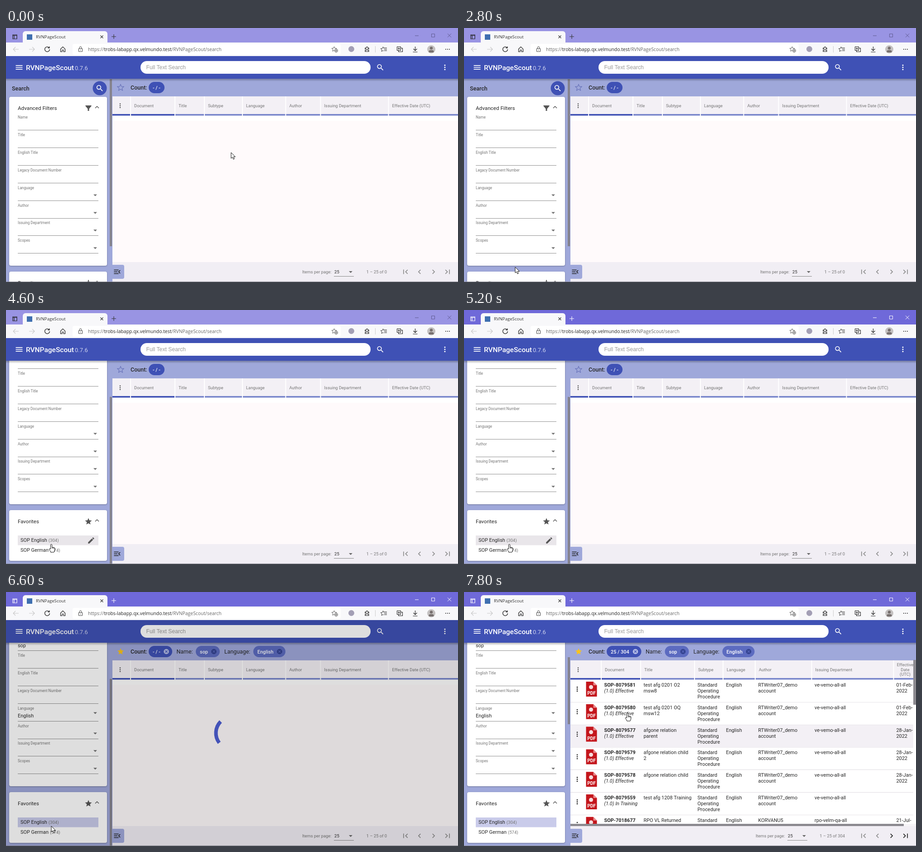
Write an HTML page with a canvas that moves like this. It is 998 by 561 pixels and loops after 8 s.

```html
<!DOCTYPE html>
<html lang="en">
<head>
<meta charset="utf-8">
<title>Document search</title>
<style>
html, body { margin: 0; width: 100%; height: 100%; overflow: hidden; background: #fff; }
canvas { display: block; width: 998px; height: 561px; }
</style>
</head>
<body>
<canvas id="stage" width="998" height="561"></canvas>
<script>
const ctx = document.getElementById('stage').getContext('2d');
const LOOP = 8000, STEP = 200;
const CLICK = 5200, LOADING = 5400, LOADED = 7600;
const INDIGO = '#3f51b5', MID = '#7986cb', PALE = '#9fa8da', PANEL = '#f3f0f5', GRAY = '#757575', INK = '#262626';
const UI = 'Roboto, sans-serif', CHROME = '"Open Sans", "Noto Sans", sans-serif';
const APP = 'RVNPageScout';

const ICONS = {
  search: 'M15.5 14h-.79l-.28-.27A6.47 6.47 0 0 0 16 9.5 6.5 6.5 0 1 0 9.5 16c1.61 0 3.09-.59 4.23-1.57l.27.28v.79l5 4.99L20.49 19zm-6 0C7 14 5 12 5 9.5S7 5 9.5 5 14 7 14 9.5 12 14 9.5 14z',
  star: 'M12 17.27L18.18 21l-1.64-7.03L22 9.24l-7.19-.61L12 2 9.19 8.63 2 9.24l5.46 4.73L5.82 21z',
  edit: 'M3 17.25V21h3.75L17.81 9.94l-3.75-3.75zM20.71 7.04a1 1 0 0 0 0-1.41l-2.34-2.34a1 1 0 0 0-1.41 0l-1.83 1.83 3.75 3.75z',
  filter: 'M3.5 4h17q1 1 0 2L14 14v6h-4v-6L3.5 6q-1-1 0-2z',
  drop: 'M7 10l5 5 5-5z',
  up: 'M12 8l-6 6 1.41 1.41L12 10.83l4.59 4.58L18 14z',
  prev: 'M15.41 7.41L14 6l-6 6 6 6 1.41-1.41L10.83 12z',
  first: 'M18.41 16.59L13.82 12l4.59-4.59L17 6l-6 6 6 6zM6 6h2v12H6z',
  menu: 'M3 18h18v-2H3zm0-5h18v-2H3zm0-7v2h18V6z',
  fold: 'M3 18h13v-2H3zm0-5h10v-2H3zm0-7v2h13V6zm18 9.59L17.42 12 21 8.41 19.59 7l-5 5 5 5z',
  cancel: 'M12 2a10 10 0 1 0 0 20 10 10 0 0 0 0-20zm5 13.59L15.59 17 12 13.41 8.41 17 7 15.59 10.59 12 7 8.41 8.41 7 12 10.59 15.59 7 17 8.41 13.41 12z',
  more: 'M12 4a2 2 0 1 0 .01 0zM12 10a2 2 0 1 0 .01 0zM12 16a2 2 0 1 0 .01 0z'
};
for (const k in ICONS) ICONS[k] = new Path2D(ICONS[k]);

const ARROW = new Path2D('M0 0V13L3 10.3L5 15L7.3 14L5.3 9.5H9.3Z');
const HAND = new Path2D('M-1.6 1.4Q0-.8 1.6 1.4V7L6 7.6Q8 8 7.9 10Q8 14 5.8 18H-1.2Q-2.6 14.5-4.7 11.5Q-4.6 9.2-1.6 11Z');

const smooth = x => { x = Math.max(0, Math.min(1, x)); return x * x * (3 - 2 * x); };

function rect(x, y, w, h, color, r = 0) {
  ctx.fillStyle = color;
  ctx.beginPath();
  ctx.roundRect(x, y, w, h, r);
  ctx.fill();
}

function disc(x, y, r, color) {
  ctx.fillStyle = color;
  ctx.beginPath();
  ctx.arc(x, y, r, 0, 7);
  ctx.fill();
}

function text(s, x, y, size, color = INK, style = '', font = UI, align = 'left') {
  ctx.font = `${style} ${size}px ${font}`;
  ctx.fillStyle = color;
  ctx.textAlign = align;
  ctx.fillText(s, x, y);
}

function lines(list, x, y, size, color, align, gap = 13) {
  list.forEach((s, i) => text(s, x, y + i * gap, size, color, '', UI, align));
}

function icon(name, x, y, size, color, flip = 1, outline = false) {
  ctx.save();
  ctx.translate(x, y);
  ctx.scale(flip * size / 24, size / 24);
  ctx.translate(-12, -12);
  if (outline) {
    ctx.strokeStyle = color;
    ctx.lineWidth = 1.6;
    ctx.stroke(ICONS[name]);
  } else {
    ctx.fillStyle = color;
    ctx.fill(ICONS[name]);
  }
  ctx.restore();
}

// Strokes a path given around (x, y).
function stroke(d, x, y, color = '#222', width = 1.1) {
  ctx.save();
  ctx.translate(x, y);
  ctx.strokeStyle = color;
  ctx.lineWidth = width;
  ctx.stroke(new Path2D(d));
  ctx.restore();
}

function clipped(x, y, w, h, draw) {
  ctx.save();
  ctx.beginPath();
  ctx.rect(x, y, w, h);
  ctx.clip();
  draw();
  ctx.restore();
}

function card(y, h) {
  ctx.save();
  ctx.shadowColor = 'rgba(0,0,0,.3)';
  ctx.shadowBlur = 3;
  ctx.shadowOffsetY = 1;
  rect(7, y, 216, h, '#fff', 4);
  ctx.restore();
}

function drawBrowser(active) {
  rect(0, 0, 998, 32, active ? '#6f69d9' : '#9994e3');
  rect(37, 7, 187, 30, '#f8f8fa', 6);
  rect(0, 32, 998, 30, '#f8f8fa');
  const ctl = active ? '#fff' : '#5f5a92';
  stroke('M-4.5-4.5H4.5V4.5H-4.5ZM-4.5-3H4.5M-1.5-3V4.5', 19.5, 19.5, active ? '#fff' : '#222', 1.2);
  rect(46, 14, 12, 12, '#3f6fb0');
  text(APP, 66, 23, 9.6, '#333', '', CHROME);
  stroke('M-3-3L3 3M3-3L-3 3', 211.5, 19.5, '#333');
  stroke('M-5 0H5M0-5V5', 238, 19, active ? '#fff' : '#333');
  stroke('M-4 0H4', 907, 17, ctl, 1);
  stroke('M-3.5-3.5H3.5V3.5H-3.5Z', 943, 16.5, ctl, 1);
  stroke('M-4-4L4 4M4-4L-4 4', 979, 16.5, ctl, 1);

  rect(147, 35, 592, 24, '#fff', 4);
  stroke('M6 0H-6M-1-5L-6 0L-1 5', 22, 47, '#c8c8c8');
  stroke('M-6 0H6M1-5L6 0L1 5', 57, 47, '#c8c8c8');
  stroke('M4.2-3.4A5.4 5.4 0 1 0 5.4 0M4.8-6.2V-2.8H1.2', 91, 47, '#222', 1.3);
  stroke('M-5-.5L0-5.5L5-.5V5.5H1.6V1.5H-1.6V5.5H-5Z', 125.5, 47, '#222', 1.2);
  stroke('M-4-1.5H4V5H-4ZM-2.2-1.5V-3.6A2.2 2.2 0 0 1 2.2-3.6V-1.5M0 1V2.5', 164.5, 47, '#444', 1);
  const scheme = 'https://', host = 'trobs-labapp.qx.velmundo.test';
  text(scheme, 181, 51, 10.4, '#666', '', CHROME);
  let x = 181 + ctx.measureText(scheme).width;
  text(host, x, 51, 10.4, '#222', '', CHROME);
  x += ctx.measureText(host).width;
  text(`/${APP}/search`, x, 51, 10.4, '#666', '', CHROME);

  icon('star', 724.5, 46.5, 13, '#444', 1, true);
  disc(729, 50, 4, '#fff');
  stroke('M-2.5 0H2.5M0-2.5V2.5M3.5 0A3.5 3.5 0 1 1-3.5 0A3.5 3.5 0 1 1 3.5 0', 729, 50, '#444', .9);
  disc(762.5, 46.5, 6.5, '#a39fb5');
  stroke('M-4-3H-1.5A1.8 1.8 0 1 1 1.8-3H4V-.5A1.8 1.8 0 1 0 4 2.5V5H-4V2.5A1.8 1.8 0 1 0-4-.5Z', 797, 47, '#222', 1.2);
  rect(815, 40, 1, 14, '#ccc');
  icon('star', 832.5, 47, 13, '#222', 1, true);
  rect(834, 43, 8, 10, '#f8f8fa');
  stroke('M-1-3H6M0 0H6M0 3H6', 835, 47, '#222', 1.2);
  stroke('M-6-5H2V3H-6ZM-3 3V6H6V-2H2M-2-3.5V1.5M-4.5-1H.5', 869.5, 46.5);
  stroke('M0-6V3M-4-1L0 3L4-1M-5 6H5', 903.5, 47, '#222', 1.2);
  disc(939, 47, 9, '#c4c1c1');
  disc(939, 44.5, 3.2, '#77706f');
  rect(933.5, 49, 11, 5, '#77706f', [4, 4, 2, 2]);
  for (const dx of [-4, 0, 4]) disc(975 + dx, 47, 1, '#222');
}

function drawHeader() {
  rect(0, 62, 998, 50, INDIGO);
  icon('menu', 29, 87, 20, '#fff');
  text(APP, 44, 93, 15.5, '#fff', '500');
  text('0.7.6', 152, 93, 13, '#cdd2ef');
  rect(297, 73, 508, 28, '#fff', 14);
  text('Full Text Search', 309.5, 91, 12.2, '#999', '', '"Liberation Sans", Arial, sans-serif');
  icon('search', 826.5, 87, 19, '#fff');
  icon('more', 969, 87, 19, '#fff');
}

function drawFavorite(name, count, y, bg, pencil, ripple) {
  if (bg) rect(26, y, 178, 21.5, bg);
  if (ripple) clipped(26, y, 178, 21.5, () => disc(99, 517, 75, '#cbc7cc'));
  text(name, 32, y + 14, 10.9);
  text(`(${count})`, 35 + ctx.measureText(name).width, y + 14, 9.6, GRAY);
  if (pencil) icon('edit', 188, y + 11, 18, '#555');
}

function drawSidebar(t, scroll, filled, hover) {
  rect(0, 112, 235, 449, PALE);
  clipped(0, 112, 235, 449, () => {
    ctx.save();
    ctx.translate(0, -scroll);
    text('Search', 13, 138, 12.5, INK, '500');
    disc(207, 133, 15.5, INDIGO);
    icon('search', 207, 133, 19, '#fff');

    card(152, 373);
    text('Advanced Filters', 26, 181, 11.7);
    icon('filter', 182, 177, 18, '#555');
    icon('up', 201, 175, 18, '#555');
    const labels = ['Name', 'Title', 'English Title', 'Legacy Document Number', 'Language', 'Author', 'Issuing Department', 'Scopes'];
    labels.forEach((label, i) => {
      const y = 200 + i * 38.9;
      text(label, 26, y, 8.2, GRAY);
      rect(26, Math.round(y + 25), 178, 1, '#909090');
      if (i > 3) icon('drop', 197, y + (filled && i === 4 ? 7.5 : 13.5), 19, '#707070');
    });
    if (filled) {
      text('sop', 26, 217.5, 10.9);
      text('English', 26, 373, 10.9);
    }

    card(538, 112);
    text('Favorites', 26, 567, 11.5);
    icon('star', 182, 563, 18, '#555');
    icon('up', 201, 561, 18, '#555');
    const over = '#e9e6ea';
    drawFavorite('SOP English', 304, 594, filled ? '#c9cbea' : hover === 1 && over, hover === 1, t === CLICK);
    drawFavorite('SOP German', 574, 616, hover === 2 && over, hover === 2);
    ctx.restore();
  });
  if (t >= LOADED) rect(229, 144, 5, 148, '#85838e');
  else rect(229, 113 + scroll * 79 / 96, 5, 369, '#85838e');
}

function chip(x, w, label, color, closable) {
  rect(x, 119, w, 25, color, 12.5);
  text(label, x + 9, 136, 10.9, '#fff', '500');
  if (closable) icon('cancel', x + w - 13, 131.5, 14, color === INDIGO ? '#b4bce6' : '#33428f');
}

function drawCountBar(filled, loaded) {
  rect(235, 112, 763, 39, PALE);
  icon('star', 253, 131.5, 17, filled ? '#fcc419' : '#6671b8', 1, !filled);
  text('Count:', 275, 136, 12.5, INK, '500');
  if (!filled) return chip(315, 35, '- / -', INDIGO);
  const dx = loaded ? 24.5 : 0;
  chip(315, 52 + dx, loaded ? '25 / 304' : '- / -', INDIGO, true);
  text('Name:', 376.5 + dx, 136, 12.4);
  chip(419 + dx, 53, 'sop', '#5c6bc0', true);
  text('Language:', 482 + dx, 136, 12.4);
  chip(546 + dx, 71, 'English', '#5c6bc0', true);
}

function drawHeadings(loaded) {
  const heads = ['Document', 'Title', 'Subtype', 'Language', 'Author', 'Issuing Department', 'Effective Date (UTC)'];
  const seps = loaded ? [303, 390, 509, 572, 643, 767.5, 948.5] : [275, 373, 438, 522, 617.5, 694.5, 844.5];
  rect(235, 151, 763, 43, '#fff');
  [234, ...seps].forEach((x, i) => {
    const w = (seps[i] || 999) - x - 2;
    rect(x + 1, 151, w, 39, PANEL);
    rect(x + 1, 190, w, 3.5, i < 2 ? INDIGO : MID);
    if (!i) icon('more', 252, 171.5, 16, '#555');
    else if (i === 7 && loaded) lines(['Effective', 'Date', '(UTC)'], 974, 164, 9.4, GRAY, 'center', 10.6);
    else text(heads[i - 1], x + 8, 174.5, 9.4, GRAY);
  });
}

function drawFileIcon(x, y) {
  ctx.fillStyle = '#c4161c';
  ctx.fill(new Path2D(`M${x} ${y}h16l8 8v25h-24z`));
  ctx.fillStyle = '#e88a8c';
  ctx.fill(new Path2D(`M${x + 16} ${y}v8h8z`));
  disc(x + 11, y + 12, 4.5, '#f6dede');
  text('PDF', x + 12, y + 29, 10, '#fff', '700', UI, 'center');
}

function drawRows() {
  const rows = [
    ['8079581', 'test afg 0201 O2|msw8', '01-Feb-'],
    ['8079580', 'test afg 0201 OQ|msw12', '01-Feb-'],
    ['8079577', 'afgone relation|parent', '28-Jan-'],
    ['8079579', 'afgone relation child|2', '28-Jan-'],
    ['8079578', 'afgone relation child', '28-Jan-'],
    ['8079559', 'test afg 1208 Training', ''],
    ['7018677', 'RPO VL Returned', '21-Jul-']
  ];
  clipped(235, 194, 757, 318, () => rows.forEach(([id, title, date], i) => {
    const y = 194 + i * 49.8, b = y + 15, last = i === 6;
    rect(235, y, 757, 49.8, i === 2 ? PANEL : '#fff');
    rect(235, Math.round(y + 49), 757, 1, '#dedbe0');
    icon('more', 250, y + 20.5, 17, '#222');
    drawFileIcon(269.5, y + 4);
    text('SOP-' + id, 309.5, b, 10.9, INK, '700');
    text(i === 5 ? '(1.0) In Training' : '(1.0) Effective', 309.5, b + 13, 10.9, INK, 'italic');
    lines(title.split('|'), 396.5, b, 10.9);
    lines(['Standard', 'Operating', 'Procedure'], 515.5, b, 10.9);
    text('English', 578.5, b, 10.9);
    lines(last ? ['KORVANU5'] : ['RTWriter07_demo', 'account'], 649.5, b, 10.9);
    text(last ? 'rpo-velm-qa-all' : 've-vemo-all-all', 774, b, 10.9);
    if (date) lines([date, '2022'], 954.5, b, 10.9);
  }));
  rect(992, 151, 6, 361, '#fff');
  rect(992, 150, 6, 99, '#8c8a90');
  rect(235, 512, 763, 5, '#f6f4f7');
  rect(235, 512, 736, 5, '#8c8a90');
}

function drawFooter(loaded) {
  rect(235, 517, 763, 44, '#f1eef4');
  rect(235, 523, 26, 31, PALE, [0, 4, 4, 0]);
  icon('fold', 245.5, 538.5, 19, '#222');
  const dx = loaded ? -10 : 0, on = loaded ? '#222' : '#8c8c8c';
  text('Items per page:', 654 + dx, 541.5, 9.4, GRAY);
  text('25', 725 + dx, 541.5, 9.6);
  rect(724 + dx, 548, 44, 1, '#888');
  icon('drop', 761 + dx, 538.5, 19, '#666');
  text(`1 – 25 of ${loaded ? 304 : 0}`, 841, 541.5, 9.4, GRAY, '', UI, 'right');
  icon('first', 882, 538.5, 20, '#8c8c8c');
  icon('prev', 913, 538.5, 20, '#8c8c8c');
  icon('prev', 944, 538.5, 20, on, -1);
  icon('first', 975, 538.5, 20, on, -1);
}

// The head runs ahead by 270 degrees, then the tail catches up, while all turns.
function drawSpinner(ms) {
  const c = ms / 1183 + .1435, n = Math.floor(c), p = c - n;
  const base = 23 + ms * .175 + 270 * n;
  const tail = base + 270 * smooth(2 * p - 1), head = base + 18 + 270 * smooth(2 * p);
  ctx.strokeStyle = '#4352b8';
  ctx.lineWidth = 8;
  ctx.beginPath();
  ctx.arc(499.5, 311.5, 36, tail * Math.PI / 180, head * Math.PI / 180);
  ctx.stroke();
}

const PATH = [[1000, 497, 275], [2200, 113, 528], [2800, 113, 528], [3400, 100, 530], [3800, 100, 530], [4600, 100, 517], [6800, 100, 517], [7800, 361, 267]];

function cursorAt(t) {
  const i = PATH.findIndex(k => k[0] > t);
  if (i < 0) return PATH[PATH.length - 1].slice(1);
  if (!i) return PATH[0].slice(1);
  const [t0, x0, y0] = PATH[i - 1], [t1, x1, y1] = PATH[i];
  const u = smooth((t - t0) / (t1 - t0));
  return [x0 + (x1 - x0) * u, y0 + (y1 - y0) * u];
}

function drawCursor(x, y, hand) {
  ctx.save();
  ctx.translate(x, y);
  ctx.fillStyle = '#fff';
  ctx.strokeStyle = '#111';
  ctx.lineWidth = 1;
  const shape = hand ? HAND : ARROW;
  ctx.fill(shape);
  ctx.stroke(shape);
  if (hand) stroke('M1.6 7V10M3.8 7.5V10M5.9 8V10.5', 0, 0, '#111', .8);
  ctx.restore();
}

function draw(t) {
  const filled = t >= LOADING, loaded = t >= LOADED, busy = filled && !loaded;
  const [x, y] = cursorAt(t);
  const hand = (t >= 3200 && !filled) || loaded;
  const hover = hand && !filled ? (y < 520 ? 1 : 2) : 0;

  drawBrowser(t >= CLICK);
  drawSidebar(t, 96 * smooth((t - 2800) / 400), filled, hover);
  rect(235, 194, 763, 323, '#fffafb');
  drawCountBar(filled, loaded);
  drawHeadings(loaded);
  if (loaded) drawRows();
  else rect(235, 194, 763, 11, '#fff');
  drawFooter(loaded);

  const shade = ctx.createLinearGradient(0, 112, 0, 118);
  shade.addColorStop(0, 'rgba(0,0,0,.28)');
  shade.addColorStop(1, 'rgba(0,0,0,0)');
  rect(0, 112, 998, 6, shade);
  drawHeader();
  rect(0, 560, 998, 1, '#8a8a94');
  if (busy) {
    rect(0, 62, 998, 499, 'rgba(0,0,0,.13)');
    drawSpinner(t - LOADING);
  }
  drawCursor(x, y, hand);
}

const start = performance.now();
function tick() {
  const t = (performance.now() - start) % LOOP;
  draw(Math.floor(t / STEP) * STEP);
  requestAnimationFrame(tick);
}
tick();
</script>
</body>
</html>
```
